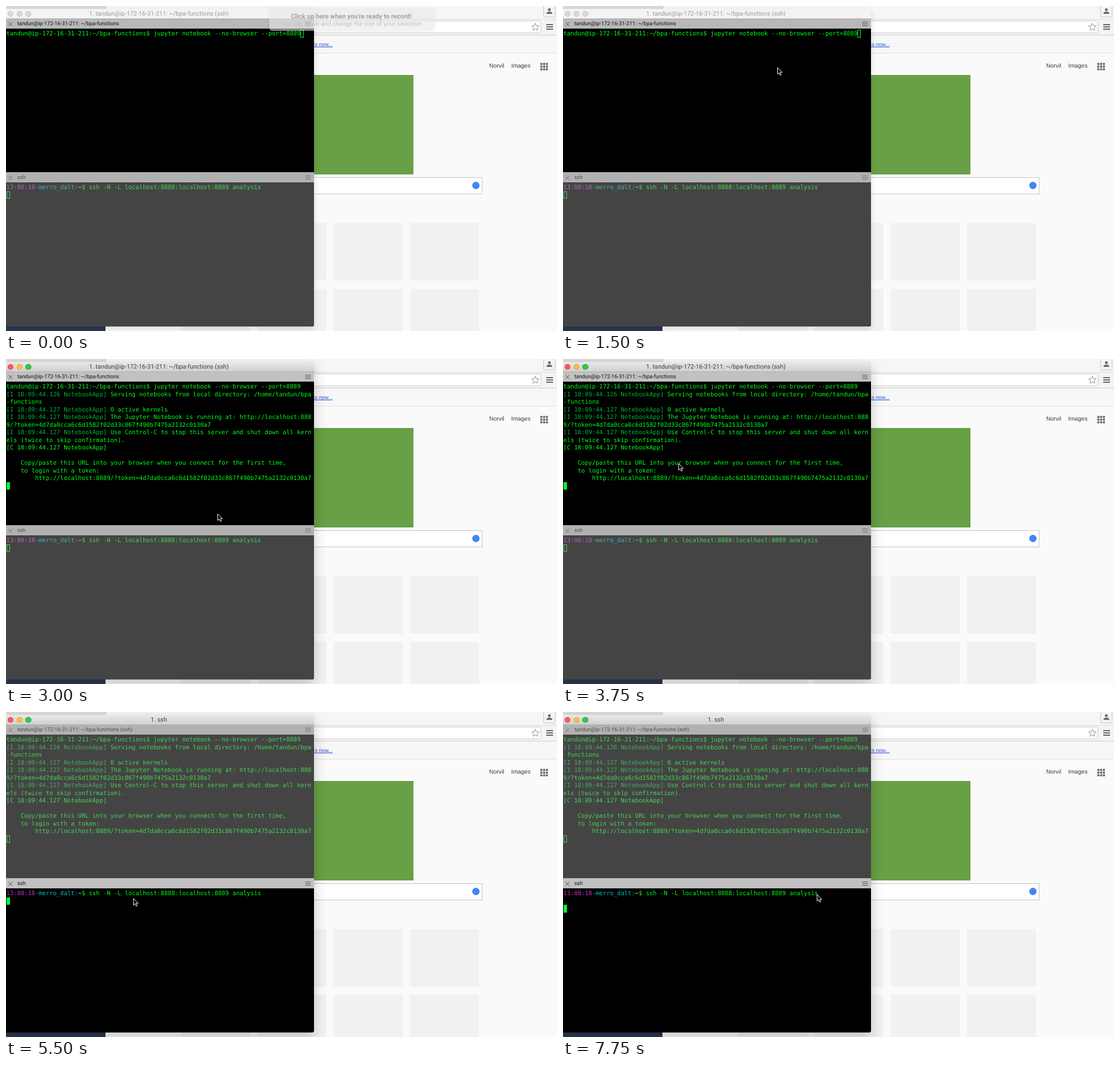
Animation of 975 by 575 pixels, one loop 8 s. Source, as an HTML page:

```html
<!DOCTYPE html>
<html lang="en">
<head>
<meta charset="utf-8">
<title>Notebook over an SSH tunnel</title>
<style>
html, body { margin: 0; width: 100%; height: 100%; overflow: hidden; background: #fafafa; }
body { position: relative; text-rendering: geometricPrecision; font: 9.37px Roboto, sans-serif; }
div, svg, pre, span.at { position: absolute; box-sizing: border-box; margin: 0; white-space: pre; }

/* every state change is a hard cut in one 8 s loop */
.cut { animation: 8s step-end infinite; }

/* browser */
.wall { left: 0; width: 176px; }
.strip { left: 176px; top: 0; right: 0; height: 24px; background: #f6f6f6; border-left: 1px solid #c4c4c4; }
.tools { left: 176px; top: 23px; right: 0; height: 29px; background: #f4f4f4; border-top: 1px solid #dadada; border-bottom: 1px solid #cbcbcb; }
.address { left: 300px; top: 26px; width: 647px; height: 22px; background: #fff; border: 1px solid #cbcbcb; border-radius: 3px; }
.marks { left: 176px; top: 52px; right: 0; height: 32px; background: #f7f7f7; border-bottom: 1px solid #e0e0e0; }
.link { right: 397px; top: 62px; color: #2a50d8; text-decoration: underline; font: 9.3px/12px "Liberation Sans", Arial, sans-serif; }
.nav { top: 101px; color: #3c3c3c; font: 10.4px/12px "Liberation Sans", Arial, sans-serif; }
.logo { left: 545px; top: 122px; width: 176px; height: 176px; background: #68a046; }
.search { left: 310px; top: 303px; width: 533px; height: 30px; background: #fff; border: 1px solid #c4c4c4; }
.mic { left: 825px; top: 311px; width: 13px; height: 13px; border-radius: 50%; background: #4285f4; }
.tiles { left: 310px; top: 384px; width: 527px; height: 191px;
  background:
    linear-gradient(#fafafa 0 0) 0 101.5px / 100% 14.5px no-repeat,
    repeating-linear-gradient(90deg, #f1f1f1 0 122px, #fafafa 122px 135px); }

/* terminal window */
.window { left: 0; top: 4.5px; width: 545px; height: 562px; border-radius: 0 4px 4px 4px;
  background: #000; animation-name: shade; }
@keyframes shade {
  0% { box-shadow: 0 4px 12px rgba(0,0,0,.14); }
  25%, 100% { box-shadow: 0 8px 22px rgba(0,0,0,.22); }
}
.title { left: 0; top: 4.5px; width: 545px; height: 18.5px; border-bottom: 1px solid #b2b2b2; animation-name: bar; }
@keyframes bar {
  0% { background: #f3f3f3; }
  25%, 100% { background: linear-gradient(#e9e7e9, #d2d0d2); }
}
.name { left: 0; top: 7px; width: 541px; text-align: center; font-size: 10.83px; line-height: 14px; }
.long { animation-name: long; }
@keyframes long {
  0% { color: #9b9b9b; }
  25% { color: #3e3e3e; }
  68.75%, 100% { color: transparent; }
}
.short { color: #3e3e3e; animation-name: late; }
.light { top: 8.5px; width: 10.4px; height: 10.4px; border-radius: 50%; background: #d8d8d8; border: .5px solid #c6c6c6; }
.lit { animation-name: lit; border-color: rgba(0,0,0,.15); }

.pane { left: 0; width: 545px; overflow: hidden; background: #000; }
.upper { top: 23px; height: 271px; }
.lower { top: 294px; height: 272.5px; border-radius: 0 0 4px 0; }
.head { left: 0; top: 0; width: 545px; height: 17px; color: #111; line-height: 18px; background: #c1c1c1; }
.upper .head { animation-name: head; }
@keyframes head { 0% { background: #b8b8b8; } 25%, 100% { background: #c1c1c1; } }
.head .at { left: 20px; top: 0; }
.head svg { left: 0; top: 0; }
.lower .head { height: 18px; }
.lower .head .at { top: 1px; }
pre { left: .6px; color: #00ff14; font: 10.555px/13.5px "DejaVu Sans Mono", monospace; }
.upper pre { top: 20.2px; }
.lower pre { top: 21.2px; }
.tag { color: #00b52d; }
.clock { color: #c930c7; }
.user { color: #00c5c7; }
.dir { color: #f4f0b0; }
.veil { inset: 0; background: rgba(156,156,156,.435); }
.upper .veil { animation-name: late; }
.lower .veil { animation-name: early; }
.log { animation-name: log; }
@keyframes late { 0% { opacity: 0; } 68.75%, 100% { opacity: 1; } }
@keyframes early { 0% { opacity: 1; } 68.75%, 100% { opacity: 0; } }
@keyframes lit { 0% { opacity: 0; } 25%, 100% { opacity: 1; } }
@keyframes log { 0% { opacity: 0; } 37.5%, 100% { opacity: 1; } }

.caret { width: 6px; height: 13.5px; border: 1px solid #00ff33; }
.c1 { animation-name: c1; }
.c2 { animation-name: c2; }
@keyframes c1 {
  0% { left: 521px; top: 19px; background: none; }
  25% { left: 521px; top: 19px; background: #00ff33; }
  31.25% { left: 1px; top: 32.5px; background: #00ff33; }
  37.5% { left: 1px; top: 194.5px; background: #00ff33; }
  68.75%, 100% { left: 1px; top: 194.5px; background: none; }
}
@keyframes c2 {
  0% { left: 1px; top: 33.5px; background: none; }
  68.75% { left: 1px; top: 33.5px; background: #00ff33; }
  84.375%, 100% { left: 1px; top: 47px; background: #00ff33; }
}

/* recorder hint, gone soon after the loop begins */
.hint { left: 466px; top: 4px; width: 292px; height: 40px; border-radius: 5px; text-align: center;
  background: rgba(232,232,232,.55); box-shadow: 0 1px 5px rgba(0,0,0,.09); animation-name: hint; }
.hint .at { left: 0; width: 290px; line-height: 14px; }
.ask { top: 7px; font-size: 11.4px; font-weight: 700; color: #a2a2a2; }
.tip { top: 20.5px; font-size: 10.8px; color: #c0c0c0; }
@keyframes hint { 0% { opacity: 1; } 3.125%, 100% { opacity: 0; } }

.mouse { left: 0; top: 0; animation-name: mouse; }
@keyframes mouse {
  0% { opacity: 0; transform: translate(418px, 223px); }
  6.25% { opacity: 1; transform: translate(418px, 223px); }
  9.375% { opacity: 1; transform: translate(400px, 182px); }
  12.5% { transform: translate(391px, 123px); }
  15.625% { transform: translate(379px, 109px); }
  18.75% { transform: translate(379px, 108px); }
  34.375% { transform: translate(359px, 127px); }
  37.5% { transform: translate(374px, 273px); }
  40.625% { transform: translate(351px, 237px); }
  43.75% { transform: translate(238px, 124px); }
  46.875% { transform: translate(204px, 184px); }
  50% { transform: translate(202px, 257px); }
  53.125% { transform: translate(216px, 306px); }
  56.25% { transform: translate(225px, 329px); }
  71.875% { transform: translate(296px, 345px); }
  75% { transform: translate(301px, 298px); }
  90.625% { transform: translate(324px, 291px); }
  93.75% { transform: translate(397px, 299px); }
  96.875%, 100% { opacity: 1; transform: translate(449px, 322px); }
}
</style>
</head>
<body>
<div class="wall" style="top:0;height:6px;background:#dddbd8"></div>
<div class="wall" style="top:560px;height:15px;background:#2b3850"></div>

<div class="strip"></div>
<div class="tools"></div>
<div class="address"></div>
<div class="marks"></div>
<div class="link">Import bookmarks now...</div>
<span class="at nav" style="left:855px">Norvil</span>
<span class="at nav" style="left:894px">Images</span>
<div class="logo"></div>
<div class="search"></div>
<div class="mic"></div>
<div class="tiles"></div>

<svg width="975" height="130" style="left:0;top:0" fill="none">
  <rect x="951.5" y="-2.5" width="20" height="22" rx="2" fill="#f5f5f5" stroke="#c2c2c2"/>
  <circle cx="961.5" cy="6.5" r="2.5" fill="#6a6a6a"/>
  <path d="M956.5 14v-1.5q0-2.5 5-2.5t5 2.5V14z" fill="#6a6a6a"/>
  <path d="M936.8 30.5l1.9 4.3 4.7.5-3.5 3.1 1 4.6-4.1-2.4-4.1 2.4 1-4.6-3.5-3.1 4.7-.5z" stroke="#8a8a8a"/>
  <path d="M956 33h12M956 37h12M956 41h12" stroke="#636363" stroke-width="2"/>
  <path d="M945.5 102.5h14M945.5 107.2h14M945.5 112h14" stroke="#666" stroke-width="3.6" stroke-dasharray="3.6 1.3"/>
</svg>

<div class="window cut"></div>
<div class="title cut"></div>
<div class="light" style="left:2.8px"></div>
<div class="light" style="left:18.6px"></div>
<div class="light" style="left:34.4px"></div>
<div class="light lit cut" style="left:2.8px;background:#fc5b57"></div>
<div class="light lit cut" style="left:18.6px;background:#fdbd3e"></div>
<div class="light lit cut" style="left:34.4px;background:#34c748"></div>
<div class="name long cut">1. tandun@ip-172-16-31-211: ~/bpa-functions (ssh)</div>
<div class="name short cut">1. ssh</div>

<div class="pane upper">
  <div class="head cut">
    <svg width="545" height="18" stroke="#555" fill="none"><path id="icons" d="M4.5 5.5l7 7m0-7l-7 7M529.5 5.5h10m-10 3h10m-10 3h10"/></svg>
    <span class="at">tandun@ip-172-16-31-211: ~/bpa-functions<span class="short cut" style="color:inherit"> (ssh)</span></span>
  </div>
  <pre>tandun@ip-172-16-31-211:~/bpa-functions$ jupyter notebook --no-browser --port=8889
<span class="log cut"><span class="tag">[I 18:09:44.126 NotebookApp]</span> Serving notebooks from local directory: /home/tandun/bpa
-functions
<span class="tag">[I 18:09:44.127 NotebookApp]</span> 0 active kernels
<span class="tag">[I 18:09:44.127 NotebookApp]</span> The Jupyter Notebook is running at: http://localhost:888
9/?token=4d7da0cca6c6d1582f02d33c867f490b7475a2132c0130a7
<span class="tag">[I 18:09:44.127 NotebookApp]</span> Use Control-C to stop this server and shut down all kern
els (twice to skip confirmation).
[C 18:09:44.127 NotebookApp]

    Copy/paste this URL into your browser when you connect for the first time,
    to login with a token:
        http://localhost:8889/?token=4d7da0cca6c6d1582f02d33c867f490b7475a2132c0130a7</span></pre>
  <div class="caret c1 cut"></div>
  <div class="veil cut"></div>
</div>

<div class="pane lower">
  <div class="head">
    <svg width="545" height="18" stroke="#555" fill="none"><use href="#icons" y="1"/></svg>
    <span class="at">ssh</span>
  </div>
  <pre><span class="clock">13:08:18</span><span class="user">-merro_dalt:</span><span class="dir">~</span>$ ssh -N -L localhost:8888:localhost:8889 analysis</pre>
  <div class="caret c2 cut"></div>
  <div class="veil cut"></div>
</div>

<div class="hint cut">
  <span class="at ask">Click up here when you're ready to record!</span>
  <span class="at tip">You can move and change the size of your selection</span>
</div>

<svg class="mouse cut" width="12" height="17">
  <path d="M.6 1v11.6l2.7-2.5 1.9 4.3 2-.9-1.9-4.1h3.5z" fill="#000" stroke="#fff"/>
</svg>
</body>
</html>
```
